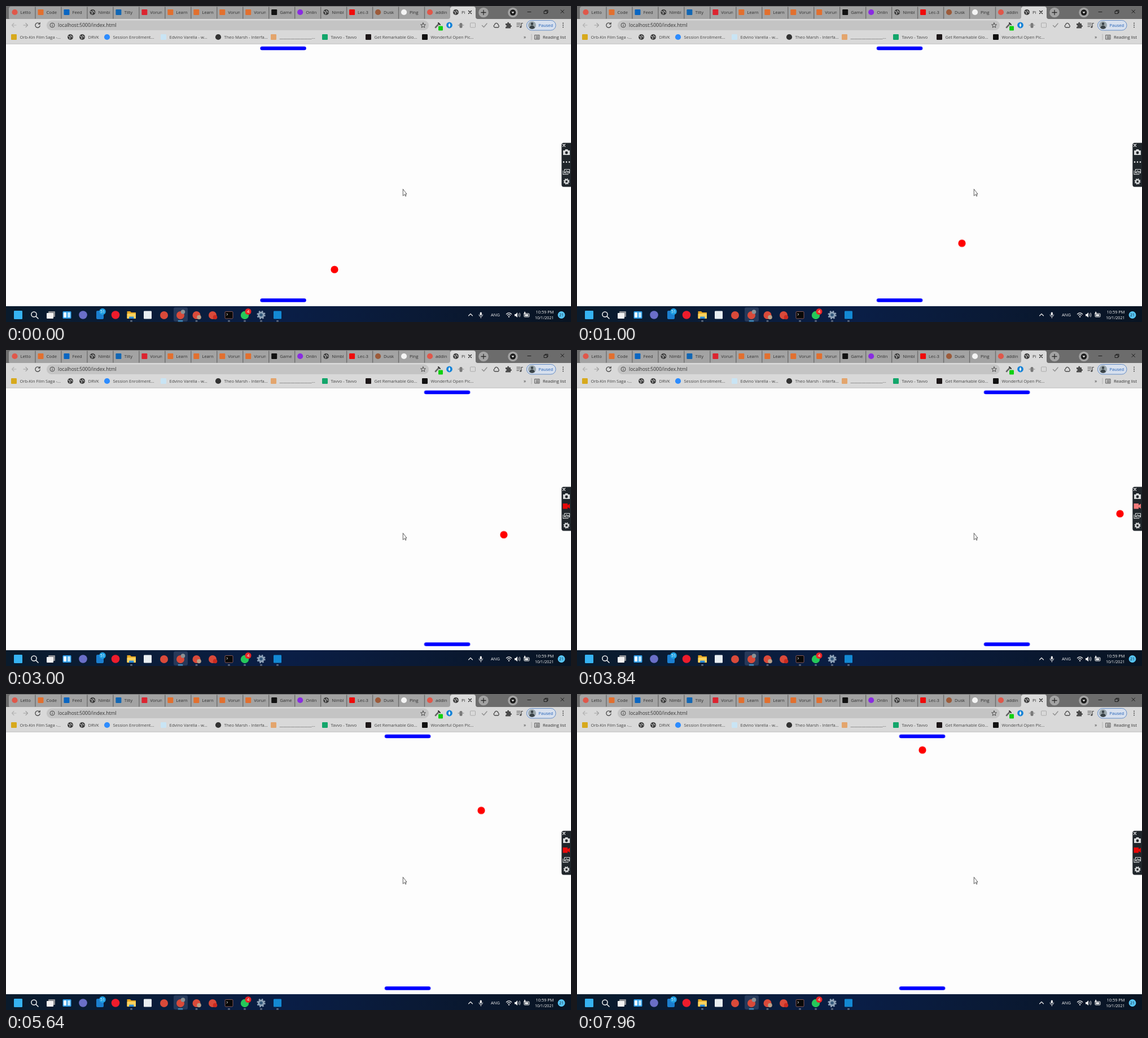
An HTML page that plays this animation: 1001 by 560 pixels, repeating every 8000 ms.

```html
<!DOCTYPE html>
<html lang="en">
<head>
<meta charset="utf-8">
<title>Paddle game</title>
<style>
  html, body { margin: 0; width: 100%; height: 100%; overflow: hidden; background: #fdfdfd; }
  svg { display: block; }
  text { font-family: "Open Sans", "Noto Sans", sans-serif; white-space: pre; }
  .line { fill: none; stroke-linecap: round; stroke-linejoin: round; }

  .ball-x, .ball-y { animation: 8s -30ms infinite; }
  .ball-x { animation-name: ball-x; }
  .ball-y { animation-name: ball-y; animation-timing-function: steps(80); }
  @keyframes ball-x {
    0% { transform: translateX(582px); animation-timing-function: steps(41); }
    51.25% { transform: translateX(992px); animation-timing-function: steps(39); }
    100% { transform: translateX(602px); }
  }
  @keyframes ball-y {
    from { transform: translateY(467px); }
    to { transform: translateY(94.6px); }
  }

  .paddles { animation: paddles 8s infinite; }
  @keyframes paddles {
    0% { transform: translateX(0); animation-timing-function: steps(8); }
    12.5% { transform: translateX(80.5px); animation-timing-function: steps(13); }
    23% { transform: translateX(210.5px); animation-timing-function: steps(8); }
    37.5% { transform: translateX(290.5px); animation-timing-function: steps(4); }
    56.5% { transform: translateX(250.5px); animation-timing-function: steps(7); }
    83.5% { transform: translateX(180.5px); animation-timing-function: steps(6); }
    99.5%, 100% { transform: translateX(120.5px); }
  }

  .wait { animation: wait 8s step-end infinite; }
  .rec { animation: show 8s step-end infinite, pulse 8s ease-in-out infinite; }
  @keyframes wait { 0% { opacity: 1; } 17.5%, 100% { opacity: 0; } }
  @keyframes show { 0% { opacity: 0; } 17.5%, 100% { opacity: 1; } }
  @keyframes pulse {
    0%, 22%, 53%, 84% { fill: #f79a9a; }
    37.5%, 68.5%, 99.5%, 100% { fill: #e80808; }
  }
</style>
</head>
<body>
<svg id="stage" width="1001" height="560" viewBox="0 0 1001 560">
  <g id="chrome"></g>

  <g class="paddles" stroke="#00f" stroke-width="6.4" stroke-linecap="round">
    <path d="M453.6 75H528.6M453.6 521.5H528.6"/>
  </g>
  <g class="ball-x"><g class="ball-y"><circle r="6.6" fill="#f00"/></g></g>

  <path d="M703.3 324.5V336.4L706 333.9L707.8 337.2L709 336.5L707.6 333.2H710Z"
        fill="#fff" stroke="#333" stroke-width=".8"/>

  <g id="recorder">
    <path d="M1001 242.5H988Q984.3 242.5 984.3 246.5V316.5Q984.3 320.5 988 320.5H1001Z" fill="#20262b"/>
    <path class="line" d="M986.5 245L990.5 249M990.5 245L986.5 249" stroke="#fff" stroke-width="1.2"/>
    <g fill="#d8dadb">
      <path d="M987 256H990L991 254H995L996 256H999V264H987Z"/>
      <g class="wait" fill="#fff">
        <circle cx="988" cy="276.5" r="1.2"/><circle cx="993" cy="276.5" r="1.2"/><circle cx="998" cy="276.5" r="1.2"/>
      </g>
      <path class="rec" d="M986.5 272H995V275L999 272.5V281L995 278.5V281.5H986.5Z"/>
    </g>
    <circle cx="993" cy="260" r="2.4" fill="#20262b"/>
    <path class="line" d="M989.5 289.5H998.5V296H989.5ZM987 292V298.5H996M990.5 295L993 292L995 294L996.5 293L998 295" stroke="#d8dadb" stroke-width="1.1"/>
    <g id="panelGear"></g>
  </g>
</svg>

<script>
const box = (x, y, w, h, fill, r = 0, extra = '') =>
  `<rect x="${x}" y="${y}" width="${w}" height="${h}" rx="${r}" fill="${fill}" ${extra}/>`;
const dot = (x, y, r, fill, extra = '') => `<circle cx="${x}" cy="${y}" r="${r}" fill="${fill}" ${extra}/>`;
const line = (d, color, width = 1.1) => `<path class="line" d="${d}" stroke="${color}" stroke-width="${width}"/>`;
const shape = (d, fill) => `<path d="${d}" fill="${fill}"/>`;
const label = (x, y, text, size = 7.5, fill = '#454545', extra = '') =>
  `<text x="${x}" y="${y}" font-size="${size}" fill="${fill}" ${extra}>${text}</text>`;
const square = (x, y, fill, s = 10) => box(x - s / 2, y - s / 2, s, s, fill, 1.2);
const globe = (x, y) => dot(x, y, 5, '#3d3d3d') +
  line(`M${x - 3.5} ${y - 1.5}L${x - .5} ${y}L${x - 1} ${y + 3.2}M${x + .5} ${y - 3}L${x + 1.5} ${y - 1}L${x + 3.6} ${y}`, '#bbb', 1.3);
const icon = (kind, x, y, color) =>
  kind === 'globe' ? globe(x, y) : kind === 'dot' ? dot(x, y, 5.1, color) : square(x, y, color);
const gear = (x, y, r, fill, hole) =>
  dot(x, y, r * .8, fill) +
  `<circle cx="${x}" cy="${y}" r="${r * .85}" fill="none" stroke="${fill}" stroke-width="${r * .4}" stroke-dasharray="${r * .335}"/>` +
  dot(x, y, r * .38, hole);

function tabStrip() {
  const orange = '#e2702f', idle = '#a3a3a3';
  const tabs = [
    ['dot', '#e0574a', 'Letto'], ['sq', orange, 'Code'], ['sq', '#0a66c2', 'Feed'], ['globe', '', 'Nimbl'],
    ['sq', '#1267b4', 'Tilty'], ['sq', '#dc2430', 'Vorun'], ['sq', orange, 'Learn'], ['sq', orange, 'Learn'],
    ['sq', orange, 'Vorun'], ['sq', orange, 'Vorun'], ['sq', '#111', 'Game'], ['dot', '#8a2be2', 'Onlin'],
    ['globe', '', 'Nimbl'], ['sq', '#f00a0a', 'Lec-3'], ['dot', '#9c5b3a', 'Dusk'], ['dot', '#f4f4f4', 'Ping'],
    ['dot', '#e0574a', 'addin'], ['globe', '', 'Pi'],
  ];
  const pitch = 45.97;
  let out = box(0, 0, 1001, 24, '#6c6c6c') + box(5, 1, 783, 23, idle, 4);
  out += shape('M783 23Q787 23 787 19V5Q787 1 791 1H828Q832 1 832 5V19Q832 23 836 23Z', '#dadada');
  tabs.forEach(([kind, color, title], i) => {
    const x = 15.5 + pitch * i, active = i === tabs.length - 1;
    if (i && !active) out += line(`M${x - 9.5} 2V22`, '#6d6d6d', 1.4);
    out += icon(kind, x, 11, color);
    out += `<svg x="${x + 10}" y="0" width="${active ? 9 : 21}" height="22">${label(0, 13.6, title, 7.7, '#303030')}</svg>`;
  });
  out += line('M819.5 8.5L824.5 13.5M824.5 8.5L819.5 13.5', '#222', 1.3);
  out += dot(846, 11.5, 8.8, idle) + line('M842 11.5H850M846 7.5V15.5', '#2b2b2b', 1.3);
  out += dot(898, 11.5, 8.8, idle) + dot(898, 11.5, 5.2, '#1c1c1c') + shape('M895.4 10.2H900.6L898 13.4Z', '#e4e4e4');
  return out + line('M924 10.5H930M953.5 9H958.5V13.5H953.5ZM955 9V7.5H960V12H958.5M983 7L988.5 12.5M988.5 7L983 12.5', '#1c1c1c', 1);
}

function toolbar() {
  const ink = '#4b4b4b', pale = '#aaa';
  let out = box(0, 23, 1001, 44.5, '#d9d9d9') + box(72, 25.5, 677, 17.5, '#c4c4c4', 8.7);
  out += line('M18 34H10.5M14 30.5L10.5 34L14 37.5', '#b3b3b3') + line('M31 34H38.5M35 30.5L38.5 34L35 37.5', '#a0a0a0');
  out += line('M59.4 31.5A4.2 4.2 0 1 0 60.2 35M60.2 29.5V32.2H57.4', ink, 1.3);
  out += dot(82, 34, 4, 'none', `stroke="${ink}"`) + line('M82 33.5V36M82 31.8V32', ink, 1);
  out += label(92, 37.2, 'localhost:5000/index.html', 8.6, '#333');
  out += line('M739 29.8L740.2 32.8L743.4 33L741 35.1L741.8 38.2L739 36.5L736.2 38.2L737 35.1L734.6 33L737.8 32.8Z', ink, 1);
  out += line('M761 38L767 31.5', '#666', 2.6) + line('M766 30L769 33', '#333', 2) + box(766, 35.5, 8, 8, '#10d010', 1.2);
  out += dot(785.5, 34, 5.4, '#1583d8') + shape('M785.5 30L787.4 34L785.5 38L783.6 34Z', '#eee');
  out += box(803.5, 30, 5, 9, '#777', 2.5) + line('M801 34H811', '#888', 1);
  out += box(822.5, 30, 9, 8, 'none', 1, `stroke="${pale}"`) + line('M843.5 34.5L846.5 37.5L852 31', '#929292', 1.5);
  out += line('M866 38H872Q874.5 36 872.2 33.5Q871 30 868 30.5Q866 31 865.5 33.5Q862.5 35.5 866 38Z', ink, 1.3);
  out += shape('M885 31H888Q888 28.5 889.7 28.5T891.4 31H894V34Q896 34 896 35.5T894 37V39.5H885V37Q887 36.8 887 35.3T885 33.7Z', ink);
  out += line('M905 30.5H911M905 33.5H911M905 36.5H908.5M913 37V30.5H915.5', ink, 1.2) + dot(911.7, 37.2, 1.6, ink);
  out += box(922.5, 25.5, 51.5, 17.5, '#d7e0ee', 8.7, 'stroke="#638bc4"');
  out += dot(932, 34, 7, '#9aa6ab') + dot(932, 31.6, 2.3, '#3a4348') + shape('M927.2 39Q928 34.5 932 34.5T936.8 39Q932 42.5 927.2 39Z', '#3a4348');
  out += label(943.5, 37, 'Paused', 7.5, '#1c5cb4');
  return out + [30.5, 34, 37.5].map(y => dot(987, y, 1, ink)).join('');
}

function bookmarks() {
  const items = [
    [14, 'sq', '#d7a91c', 'Orb-Kin Film Saga -...'], [114, 'globe', '', ''], [135, 'globe', '', 'DRVK'],
    [179, 'dot', '#2d8cff', 'Session Enrollment...'], [279, 'sq', '#c9e4f4', 'Edvino Varella - w...'],
    [376, 'dot', '#333', 'Theo Marsh - Interfa...'], [474, 'sq', '#e3a56d', '_________________...'],
    [565, 'sq', '#13a66b', 'Tavvo - Tavvo'], [642, 'sq', '#1d1718', 'Get Remarkable Glo...'],
    [742, 'sq', '#111', 'Wonderful Open Pic...'],
  ];
  let out = items.map(([x, kind, color, title]) => icon(kind, x, 55, color) + label(x + 10.5, 58, title)).join('');
  out += label(917, 58, '»', 8.5) + line('M931 50V60', '#b5b5b5', 1);
  out += line('M937 51.5H945V59H937ZM939 53.5H943.5M939 55.5H943.5M939 57.3H943.5', '#4b4b4b', .9);
  return out + label(951, 58, 'Reading list', 7.65, '#333') + box(0, 66.7, 1001, .9, '#bdbdbd');
}

function taskbar() {
  const y = 547.5, white = '#f2f2f2';
  let out = box(0, 532, 1001, 28, 'url(#bar)') + box(297, 534, 25, 25, '#26395a', 3);
  out += square(21.5, y, '#36b3f2', 15);
  out += dot(49.5, 546.5, 4.6, 'none', `stroke="${white}" stroke-width="1.5"`) + line('M53 550L57 554', white, 1.6);
  out += box(75, 541, 12, 10, '#8c8f94', 1) + box(72, 544, 12, 10, white, 1);
  out += box(100.5, 541, 15, 13, '#2c9ce8', 1.5) + box(102, 543, 5, 9, '#fff', 1) + box(109, 543, 5, 9, '#b9e4ff', 1);
  out += dot(136.5, y, 7.3, '#6a6fc8');
  out += box(160, 540, 13, 15, '#1b7fd0', 2) + dot(171, 541.5, 5.8, '#1ea0e4') + label(171, 544, '51', 6.8, '#fff', 'text-anchor="middle"');
  out += dot(194, y, 7.3, '#ee1c2c');
  out += shape('M214.5 541H220L222 543H230V554H214.5Z', '#e6a721') + box(214.5, 545, 15.5, 9, '#fcd35f', 1) + box(218, 550.5, 8.5, 3.5, '#2b8ad8', 1);
  out += square(251, y, '#e8eef2', 14);
  [280, 309, 337.5, 366].forEach((x, i) => {
    out += dot(x, 548, 7, '#d94a3a');
    if (i) out += dot(x + 4.5, i === 1 ? 542 : 551.5, 3.8, ['', '#8b9195', '#b6a089', '#c92a20'][i]);
  });
  out += box(388, 541.5, 14, 12.5, '#080808', 1.5, 'stroke="#a66b64" stroke-width=".8"') + line('M391 545L393 546.5L391 548', '#ddd', .9);
  out += dot(423, 548, 7.2, '#25c85a') + dot(429, 541.5, 5.5, '#e82626') + label(429, 544.4, '4', 8, '#fff', 'text-anchor="middle"');
  out += gear(452, y, 7.3, '#8fa3b8', '#35597c') + square(481, y, '#1389d4', 14);
  [222, 309, 337.5, 395, 423, 452, 481].forEach(x => {
    const w = x === 309 ? 9 : 4;
    out += box(x - w / 2, 557.5, w, 1.5, x === 309 ? '#56baf0' : '#929aa6', .7);
  });
  out += line('M819.5 549L823 545.5L826.5 549', white, 1.1);
  out += box(839.7, 542.5, 3.2, 6, white, 1.6) + line('M838 547Q838 550.5 841.3 550.5T844.6 547M841.3 550.5V553', white, .9);
  out += label(859, 550.3, 'ANG', 7.5, white);
  out += line('M886.5 546Q891 541.8 895.5 546M888.5 548.2Q891 545.6 893.5 548.2', white, 1.2) + dot(891, 550.6, 1.2, white);
  out += shape('M901 546H903L906 543V552L903 549.5H901Z', white) + line('M908 545.5Q909.3 547.5 908 549.8M910 544Q912.3 547.5 910 551', white, .9);
  out += box(918, 545, 9, 6, 'none', 1, `stroke="${white}"`) + box(919.3, 546.3, 6, 3.4, white) + shape('M919 541L921 545L917 546Z', white);
  out += label(970.5, 544.8, '10:59 PM', 7.4, white, 'text-anchor="end"') + label(970.5, 555, '10/1/2021', 7.1, white, 'text-anchor="end"');
  return out + dot(984, 547.5, 6.4, '#56c4f3') + label(984, 550, '21', 6.8, '#14212e', 'text-anchor="middle"');
}

document.getElementById('chrome').innerHTML =
  '<linearGradient id="bar"><stop stop-color="#0a1b2c"/><stop offset=".5" stop-color="#0a1e46"/><stop offset=".72" stop-color="#0a1a36"/><stop offset="1" stop-color="#091422"/></linearGradient>' +
  box(0, 0, 1001, 560, '#fdfdfd') + tabStrip() + toolbar() + bookmarks() + taskbar();
document.getElementById('panelGear').innerHTML = gear(993, 311, 5.2, '#d8dadb', '#20262b');
</script>
</body>
</html>
```
